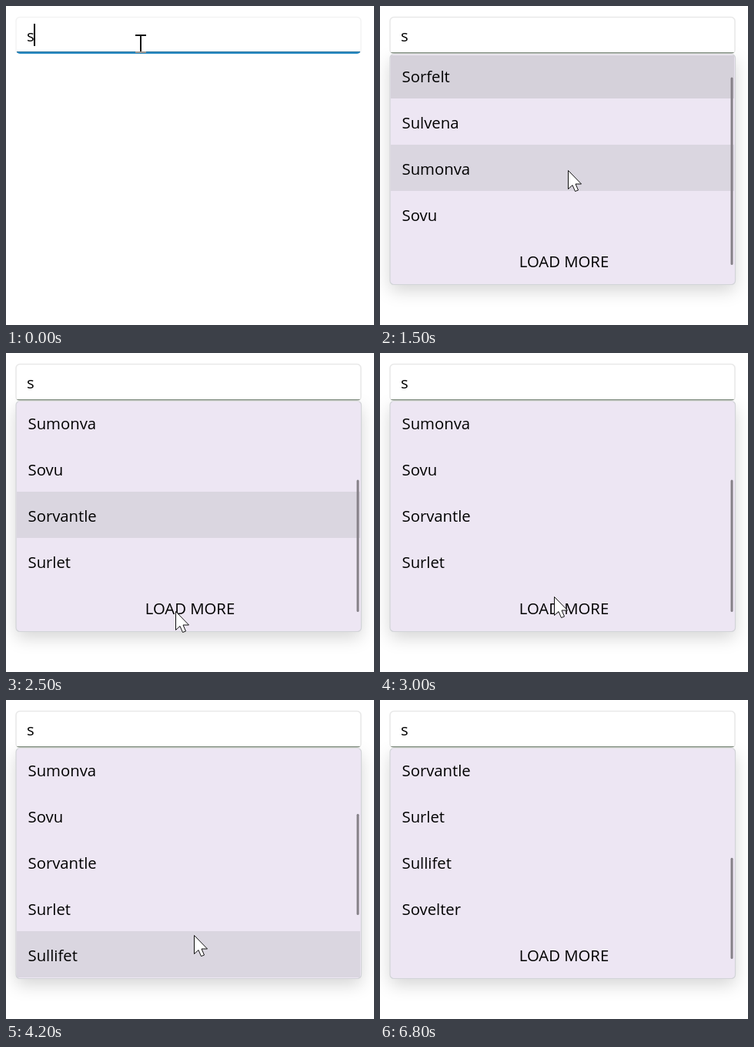
An HTML page with a canvas that plays this animation: 478x414 px, repeating every 7000 ms.

```html
<!DOCTYPE html>
<html lang="en">
<head>
<meta charset="utf-8">
<title>Autocomplete with load more</title>
<style>
  html, body { margin: 0; width: 100%; height: 100%; overflow: hidden; background: #fff; }
  canvas { display: block; }
</style>
</head>
<body>
<canvas id="stage" width="478" height="414"></canvas>
<script>
const ctx = document.getElementById('stage').getContext('2d');
const LOOP = 7000, STEP = 100;
const ROW = 60, PAGE = 2, LIST_TOP = 64, VIEW = 296;
const OPEN_AT = 100, SETTLE = 300;
const clicks = [900, 2200, 4200];
const brands = ['Sorfelt', 'Sulvena', 'Sumonva', 'Sovu', 'Sorvantle', 'Surlet', 'Sullifet', 'Sovelter'];

// Pointer stops, joined by straight moves
const stops = [
  { t: 0, x: 175, y: 48 },
  { t: 500, x: 273, y: 182 },
  { t: 1500, x: 244, y: 213 },
  { t: 2000, x: 220, y: 335 },
  { t: 2900, x: 220, y: 335 },
  { t: 3200, x: 238, y: 278 },
  { t: 3600, x: 246, y: 306 },
  { t: 4900, x: 242, y: 304 },
  { t: 5500, x: 228, y: 430 }
];

function pointerAt(t) {
  const i = stops.findIndex(s => s.t > t);
  if (i < 0) return { ...stops.at(-1), restSince: t };
  const a = stops[Math.max(0, i - 1)], b = stops[i];
  const p = Math.max(0, t - a.t) / (b.t - a.t);
  const resting = a.x === b.x && a.y === b.y;
  return {
    x: Math.round(a.x + (b.x - a.x) * p),
    y: Math.round(a.y + (b.y - a.y) * p),
    restSince: resting ? a.t : t
  };
}

// Each click loads a page; the list scrolls to its end shortly after.
const clicksBy = t => clicks.filter(c => c <= t).length;
const countAt = t => PAGE * (1 + clicksBy(t));
const contentAt = t => (countAt(t) + 1) * ROW;
const scrollAt = t => Math.max(0, contentAt(t - SETTLE) - VIEW);

// The highlight trails the pointer by one step and sticks to its row while the pointer rests.
function hoveredAt(t) {
  const { y, restSince } = pointerAt(t - STEP);
  const scroll = scrollAt(restSince < t - STEP ? restSince : t);
  return Math.floor((y - LIST_TOP + scroll) / ROW);
}

function rect(x, y, w, h, color) {
  ctx.fillStyle = color;
  ctx.fillRect(x, y, w, h);
}

function roundRect(x, y, w, h, r) {
  ctx.beginPath();
  ctx.roundRect(x, y, w, h, r);
}

function text(str, x, y, align = 'left') {
  ctx.font = '20.3px "Open Sans", "Noto Sans", sans-serif';
  ctx.textAlign = align;
  ctx.fillStyle = '#000';
  ctx.fillText(str, x, y);
}

function drawField(focused, open) {
  ctx.save();
  roundRect(13, 14.5, 448, 47.5, 5);
  ctx.fillStyle = '#fff';
  ctx.fill();
  ctx.strokeStyle = open ? '#e8e8e8' : '#f3f3f3';
  ctx.lineWidth = 1.5;
  ctx.stroke();
  ctx.clip();
  if (focused) {
    rect(14, 59, 446, 3, '#2b8cc4');
    rect(14, 59, 446, 1, '#27719b');
  } else {
    rect(14, 60, 446, 1.5, '#849083');
  }
  ctx.restore();
  text('s', 27, 46);
  if (focused) rect(36, 23, 2, 29, '#000');
  if (focused && open) drawClear(438, 38);
}

function drawClear(x, y) {
  ctx.strokeStyle = '#444';
  ctx.lineWidth = 1.5;
  ctx.beginPath();
  ctx.arc(x, y, 10.5, 0, Math.PI * 2);
  for (const s of [1, -1]) {
    ctx.moveTo(x - 4.5, y - 4.5 * s);
    ctx.lineTo(x + 4.5, y + 4.5 * s);
  }
  ctx.stroke();
}

function drawList(t) {
  const count = countAt(t), scroll = scrollAt(t), hover = hoveredAt(t);
  const bottom = count > PAGE ? 361 : 241;
  const frame = () => roundRect(13, 62.5, 448.5, bottom - 62, 5);

  ctx.save();
  ctx.shadowColor = 'rgba(0,0,0,.17)';
  ctx.shadowBlur = 22;
  ctx.shadowOffsetY = 8;
  frame();
  ctx.fillStyle = '#ede6f3';
  ctx.fill();
  ctx.restore();

  ctx.save();
  frame();
  ctx.clip();
  ctx.beginPath();
  ctx.rect(13, LIST_TOP, 448, bottom - LIST_TOP);
  ctx.clip();
  brands.slice(0, count).forEach((name, i) => {
    const y = LIST_TOP + i * ROW - scroll;
    if (i === 0) rect(14, y, 446, ROW, '#d5d1da');
    else if (i === hover) rect(14, y, 446, ROW, '#dad6e0');
    text(name, 28.5, y + 39);
  });
  text('LOAD MORE', 239, LIST_TOP + count * ROW - scroll + 39, 'center');
  drawThumb(contentAt(t), scroll);
  ctx.restore();

  frame();
  ctx.strokeStyle = '#d2d4d8';
  ctx.lineWidth = 1.2;
  ctx.stroke();
}

function drawThumb(content, scroll) {
  const top = 89, track = 247, inset = 9;
  const size = (track + inset) * Math.min(1, VIEW / content) - inset;
  const y = top + (track - size) * scroll / Math.max(1, content - VIEW);
  roundRect(455.5, y, 3, size, 1.5);
  ctx.fillStyle = '#858087';
  ctx.fill();
}

function drawBeam(x, y) {
  rect(x - 7, y - 11, 14, 2, '#111');
  rect(x - 1, y - 11, 2, 22, '#111');
  rect(x - 7, y + 11, 14, 2, '#a09890');
}

function drawArrow(x, y) {
  ctx.fillStyle = '#fff';
  ctx.strokeStyle = '#111';
  ctx.lineWidth = 1;
  const arrow = new Path2D('M0 0V24L5.5 19L9 27L13 25.5L9.5 17.5H17Z');
  ctx.save();
  ctx.translate(x + .5, y + .5);
  ctx.fill(arrow);
  ctx.stroke(arrow);
  ctx.restore();
}

function draw(t) {
  const open = t >= OPEN_AT;
  rect(0, 0, 478, 414, '#fff');
  if (open) drawList(t);
  drawField(clicksBy(t) === 0, open);
  const { x, y } = pointerAt(t);
  (y < 62 ? drawBeam : drawArrow)(x, y);
}

const start = performance.now();
function tick() {
  const t = (performance.now() - start) % LOOP;
  draw(Math.floor(t / STEP) * STEP);
  requestAnimationFrame(tick);
}
tick();
</script>
</body>
</html>
```
